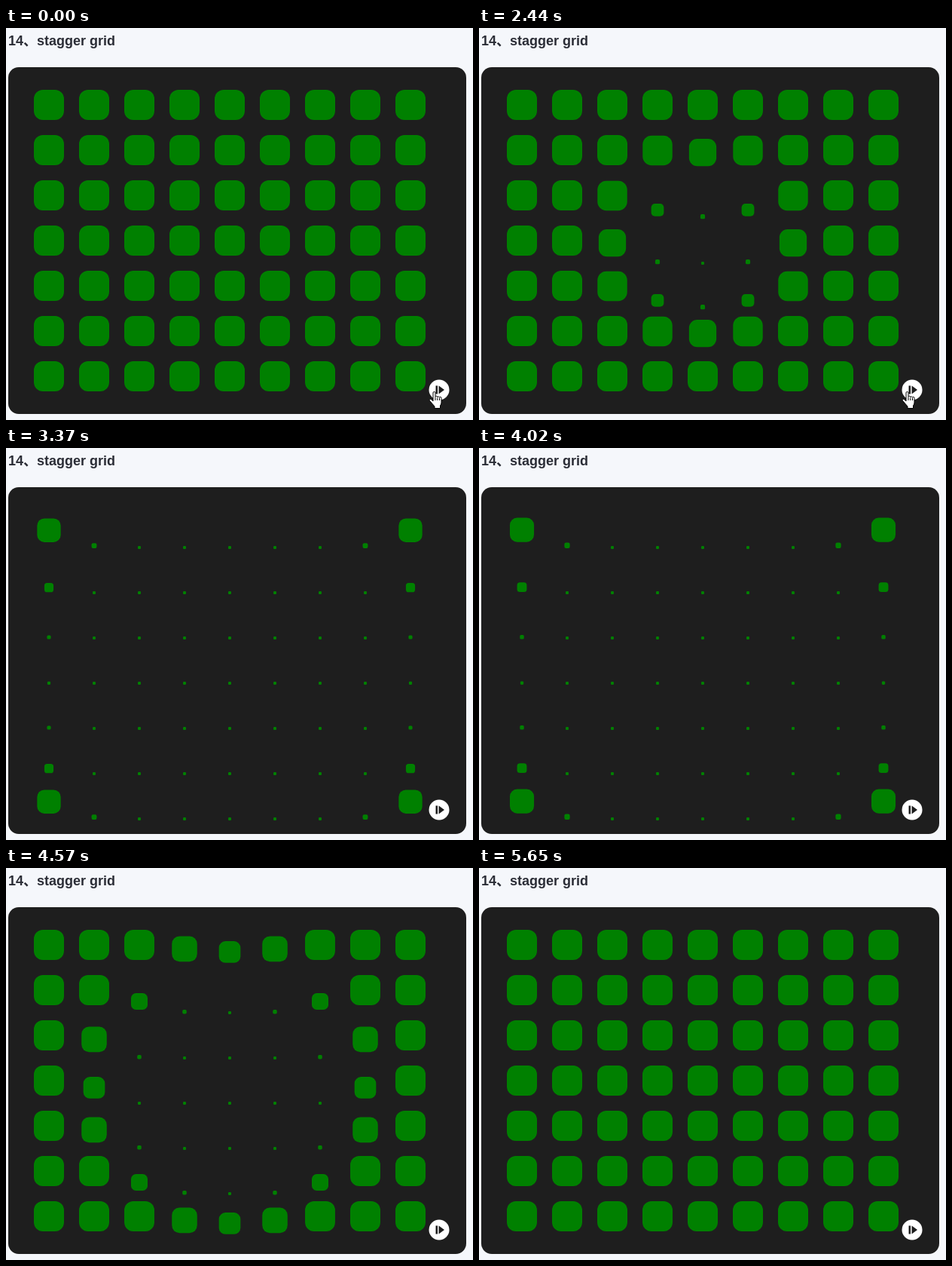
An HTML page with a canvas that plays this animation: 620 by 520 pixels, repeating every 5750 ms.

```html
<!DOCTYPE html>
<html lang="en">
<head>
<meta charset="utf-8">
<title>stagger grid</title>
<style>
  html, body { margin: 0; width: 620px; height: 520px; overflow: hidden; background: #f5f7fb; }
  canvas { display: block; }
</style>
</head>
<body>
<canvas id="stage" width="620" height="520"></canvas>
<script>
const ctx = document.getElementById('stage').getContext('2d');
const LOOP = 5750;
const COLS = 9, ROWS = 7, PITCH = 60, SIZE = 40;
const TWEEN = 484.5;   // ms one box takes to shrink
const PEAK = 3691.5;   // the whole sequence runs backwards from here
const STAGGER = 0.6;   // delay per cell of distance, in tweens

// The picture is held between these moments.
const TICKS = [0, 1890, 2030, 2180, 2310, 2440, 2570, 2700, 2830, 2960,
  3110, 3240, 3370, 3500, 3630, 3890, 4020, 4180, 4310, 4440, 4570, 4700,
  4850, 5000, 5130, 5260, 5390, 5520, 5650];

const HAND = new Path2D('M5.5 13V2a1.5 1.5 0 0 1 3 0V7.5a1.4 1.4 0 0 1 2.8.3' +
  'a1.4 1.4 0 0 1 2.7.6a1.3 1.3 0 0 1 2.5.8V15q0 2-1.5 4V22.5H7.5V20' +
  'Q5 17 1 12.5C0 10.5 2 9.5 3.5 11z M8.5 8v4M11.3 8.5v3.5M14 9v3');
const ARROW = new Path2D('M.5.5V16.5L4 13L6.5 18.5L9 17.5L6.5 12H11.5z');

const clamp = x => Math.min(1, Math.max(0, x));
const easeInOut = x => x < 0.5 ? 2 * x * x : 1 - 2 * (1 - x) ** 2;

function roundRect(x, y, w, h, r, fill) {
  ctx.fillStyle = fill;
  ctx.beginPath();
  ctx.roundRect(x, y, w, h, r);
  ctx.fill();
}

function drawBoxes(t) {
  const head = Math.min(4, 4.01 - Math.abs(t - PEAK) / TWEEN);
  for (let row = 0; row < ROWS; row++) {
    for (let col = 0; col < COLS; col++) {
      const dist = Math.hypot(col - 4, row - 3);
      const p = easeInOut(clamp(head - dist * STAGGER));
      const scale = 1 - 0.9 * p, size = SIZE * scale;
      const cx = 57 + col * PITCH, cy = 102 + row * PITCH + 30 * p;
      roundRect(cx - size / 2, cy - size / 2, size, size, 12 * scale, '#008000');
    }
  }
}

function drawButton() {
  roundRect(561.5, 466.5, 27, 27, 13.5, '#fff');
  ctx.fillStyle = '#1e1e1e';
  ctx.fillRect(570.5, 474.5, 2.5, 11);
  ctx.fill(new Path2D('M574.5 474.5L582 480L574.5 485.5z'));
}

function drawPointer(path, x, y) {
  ctx.save();
  ctx.translate(x, y);
  ctx.fillStyle = '#fff';
  ctx.strokeStyle = '#000';
  ctx.fill(path);
  ctx.stroke(path);
  ctx.restore();
}

function draw(now) {
  const clock = now % LOOP;
  const t = TICKS.findLast(tick => tick <= clock);
  ctx.fillStyle = '#f5f7fb';
  ctx.fillRect(0, 0, 620, 520);
  ctx.fillStyle = '#2b2d36';
  ctx.font = 'bold 18px "Liberation Sans", "Noto Sans CJK SC", sans-serif';
  ctx.fillText('14、stagger grid', 3, 23);
  roundRect(3, 52, 608, 460, 14, '#1e1e1e');
  drawBoxes(t);
  drawButton();
  if (t < 2700) drawPointer(HAND, 561.5, 482);
  else if (t < 2830) drawPointer(ARROW, 585, 503);
  requestAnimationFrame(draw);
}
draw(0);
</script>
</body>
</html>
```
